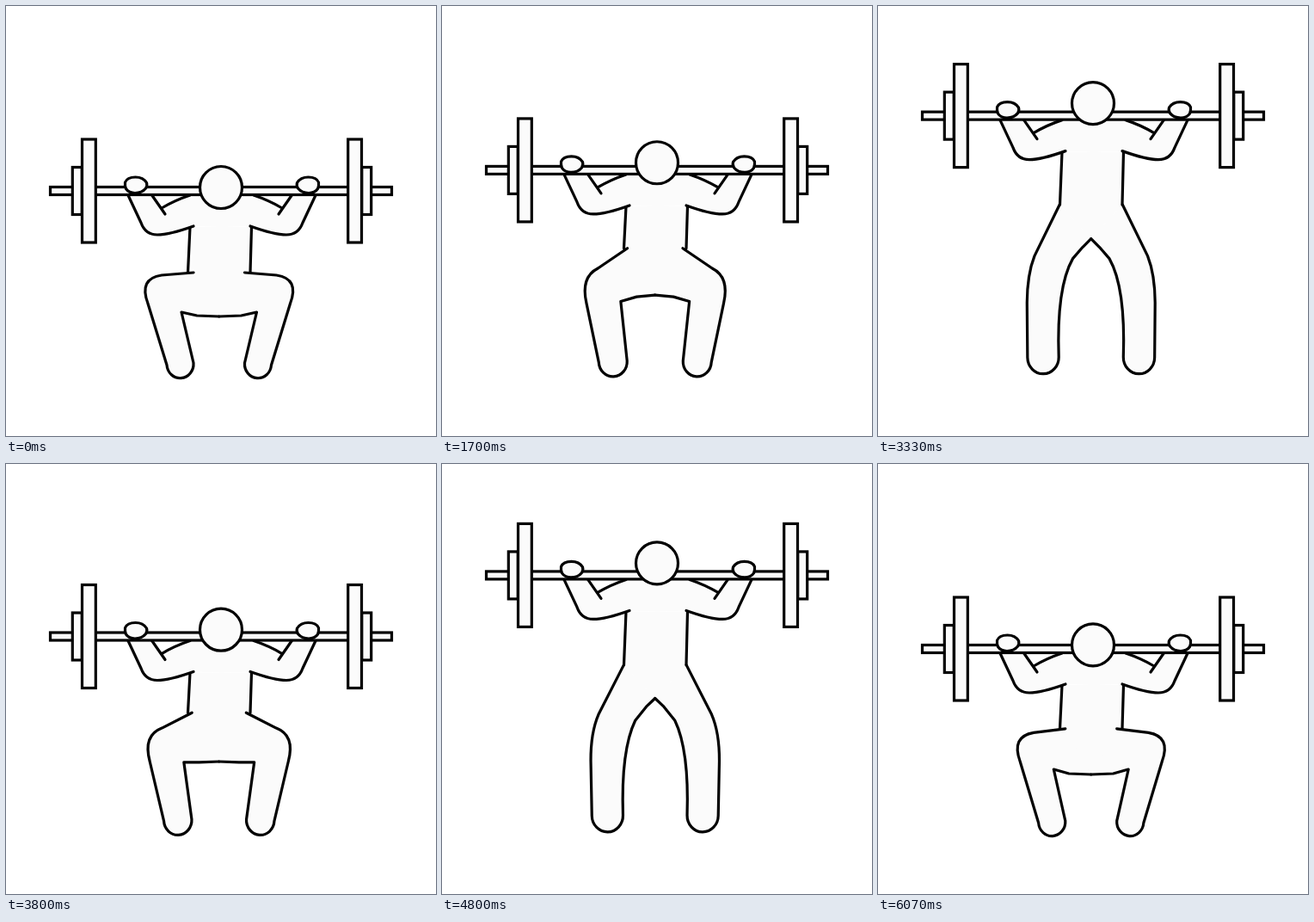
Animation of 500 by 500 pixels, one loop 6.11 s. Source, as an HTML page:

```html
<!DOCTYPE html>
<html lang="en">
<head>
<meta charset="utf-8">
<title>Barbell squat</title>
<style>
  html, body { margin: 0; width: 100%; height: 100%; overflow: hidden; background: #fff; }
  svg { display: block; width: 100vw; height: 100vh; }
  .line { fill: none; }
  .skin { stroke: none; }
  rect { stroke-linejoin: miter; }
</style>
</head>
<body>
<svg viewBox="0 0 500 500" fill="#fbfbfb" stroke="#000" stroke-width="3.2" stroke-linecap="round" stroke-linejoin="round">
  <defs>
    <g id="arm">
      <path class="skin" d="M141.5 4L157 37Q162 51 176 51Q190 51 218 41L251 42V0L214 5Q196 11 181 20L185 27L169 4Z"/>
      <path class="line" d="M141.5 4L157 37Q162 51 176 51Q190 51 218 41M169 4L185 27M181 20Q196 11 214 5"/>
    </g>
    <g id="grip">
      <rect x="77.3" y="-27.5" width="11" height="55"/>
      <rect x="88.5" y="-60" width="15.8" height="120"/>
      <path d="M138.5 -10Q141 -16 150.5 -16Q159.5 -16 163.5 -9.5Q164.5 -6 162.5 -3Q158 2.5 150 2.5Q143 2.5 139.5 -2.5Q138 -6 138.5 -10Z"/>
    </g>
  </defs>
  <path id="torso" class="skin"/>
  <path id="leg"/>
  <use href="#leg" transform="translate(495.5) scale(-1 1)"/>
  <path id="sides" class="line"/>
  <g id="upper">
    <use href="#arm"/>
    <use href="#arm" transform="translate(502) scale(-1 1)"/>
    <rect x="51.5" y="-4.5" width="397" height="9"/>
    <use href="#grip"/>
    <use href="#grip" transform="translate(502) scale(-1 1)"/>
    <circle id="head" cx="250" r="24.5"/>
  </g>
</svg>
<script>
const LOOP = 6110, STEP = 100 / 3;          // ms
const CYCLE = 61.25, RISE = 23, REST = 0.5; // steps

const $ = id => document.getElementById(id);
const set = (id, name, value) => $(id).setAttribute(name, value);
const clamp = (v, lo, hi) => Math.min(hi, Math.max(lo, v));
const mix = (a, b, f) => a + (b - a) * f;
const point = (x0, y0, x1, y1, f) => [mix(x0, x1, f), mix(y0, y1, f)];

function ease(u) {
  u = clamp(u, 0, 1);
  return u * u * (3 - 2 * u);
}

// Each limb point runs from its squatting to its standing place
function legPath(hip, crotch, lift, bend) {
  const thigh = point(181, 313, 182, 290, bend);
  const knee = point(154, 317, 174, 312, bend);
  const shin = point(165, 346, 173.5, 345, bend);
  const outer = point(187, 417.5, 173.5, 408.5, bend);
  const inner = point(218, 415, 210, 408, bend);
  const side = point(222, 360, 238, 280, lift);

  // Near standing, the fold behind the knee slides up and bows the calf
  const late = clamp((bend - 0.72) / 0.28, 0, 1);
  const fold = [204 + 11 * bend + 13 * late, 356 - 36 * bend - 30 * late];
  const calf = [(inner[0] + fold[0]) / 2 - 12 * late, (inner[1] + fold[1]) / 2 - 26 * late];

  // A radius of 1 grows to a half circle across the foot
  return `M${hip}L${thigh}Q${knee} ${shin}L${outer}A1 1.06 0 0 0 ${inner}Q${calf} ${fold}L${side}L${crotch}`;
}

function draw(time) {
  const n = Math.floor((time % LOOP + 4) / STEP);
  const away = Math.abs(n - Math.round(n / CYCLE) * CYCLE) - REST;
  const k = clamp(away, 0, RISE);
  const rise = k / RISE;
  const lift = ease((k - 2.8) / 20.2);
  const bend = (rise + lift) / 2;

  const barY = 215 - 88 * lift, chestY = barY + 42;
  set("upper", "transform", `translate(0 ${barY})`);
  set("head", "cy", -4 - 11 * rise);

  const hip = point(218, 310, 211, 229, bend);
  const crotch = [247.75, 361 - 91 * lift];
  const hipY = hip[1];
  set("leg", "d", legPath(hip, crotch, lift, bend));
  set("torso", "d", `M214 ${chestY}H285L284 ${hipY}L${crotch}L211.5 ${hipY}Z`);
  set("sides", "d", `M214 ${chestY}L211.5 ${hipY}M285.5 ${chestY}L284 ${hipY}`);
}

let start;
function tick(now) {
  start ??= now;
  draw(now - start);
  requestAnimationFrame(tick);
}
draw(0);
requestAnimationFrame(tick);
</script>
</body>
</html>
```
